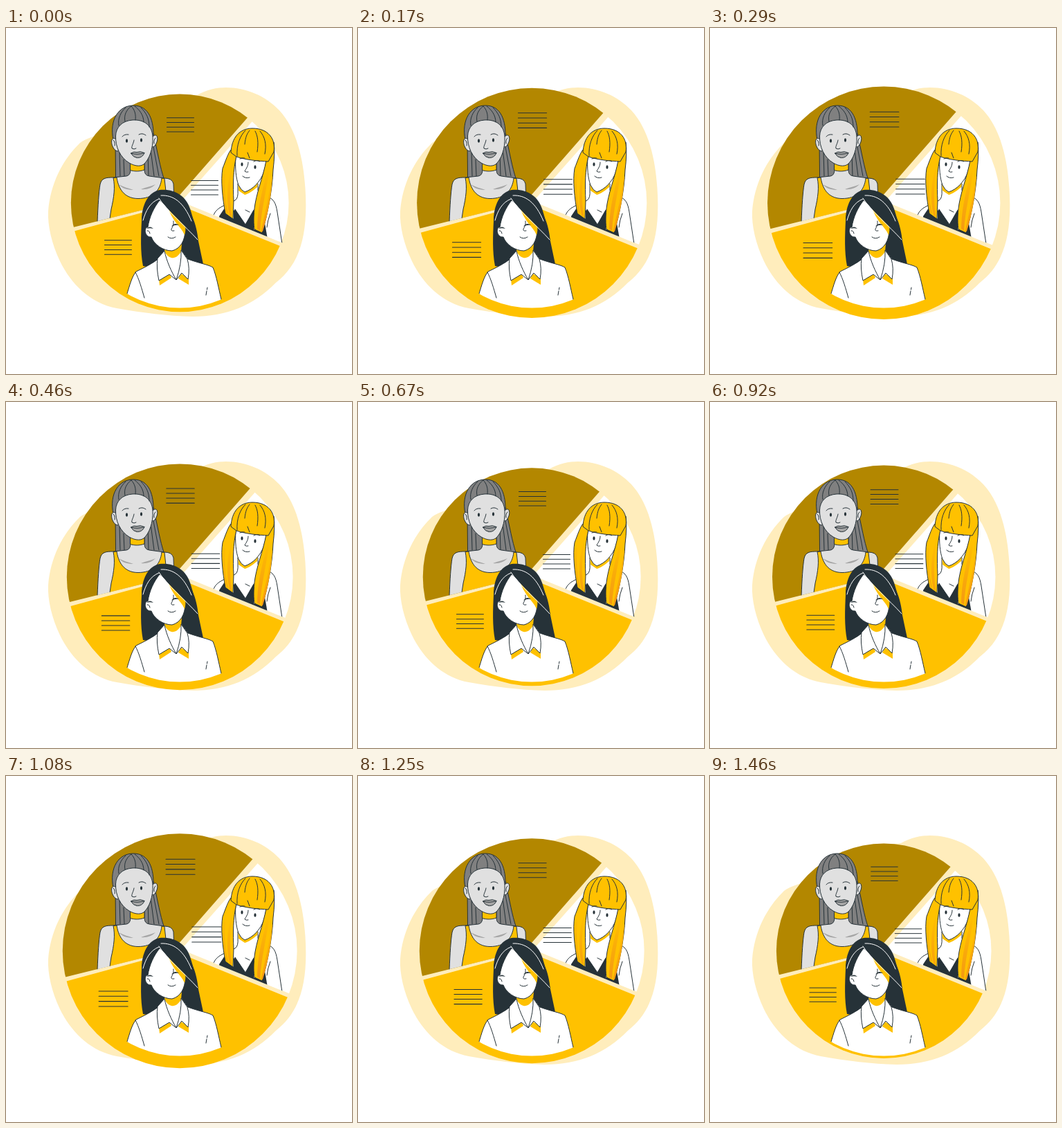
Recreate the animation shown at these times as an HTML page. Size 500 by 500 pixels, loop 1.5 s.

```html
<!DOCTYPE html>
<html lang="en">
<head>
<meta charset="utf-8">
<title>Team pie</title>
<style>
  html, body { margin: 0; width: 100%; height: 100%; overflow: hidden; background: #fff; }
  svg { display: block; width: 100%; height: 100%; }
  .ink { fill: none; stroke: #263238; stroke-width: 1; stroke-linecap: round; stroke-linejoin: round; }
  .dark { fill: #263238; }
  .white { fill: #fff; }
  .amber { fill: #ffc100; }
  .skin { fill: #e0e0e0; }
  .hair { fill: #808080; }
  .shade { fill: #a6a6a6; }
  .strand { fill: url(#strand); }
  .edge { stroke: #263238; stroke-width: 1; stroke-linejoin: round; }
  .shine { fill: none; stroke: #fff; stroke-width: 1; stroke-linecap: round; }
</style>
</head>
<body>
<svg viewBox="0 0 500 500">
  <defs>
    <clipPath id="disc"><circle cx="251.2" cy="252.8" r="157.3"/></clipPath>
    <clipPath id="leftCut"><path d="M90 90H260V247.3L90 289.7Z"/></clipPath>
    <clipPath id="rightCut"><path d="M285 130H420V318.7L285 263.9Z"/></clipPath>
    <clipPath id="frontCut"><circle cx="251.2" cy="252.6" r="152"/></clipPath>
    <linearGradient id="strand" gradientUnits="userSpaceOnUse" x1="0" y1="200" x2="0" y2="290">
      <stop stop-color="#ffc100"/><stop offset="1" stop-color="#f59a12"/>
    </linearGradient>
  </defs>

  <path fill="#ffedbc" d="M318 86C347 86 375 98 395 119C420 146 430 190 432.500 232C437 300 424 342 390 368
    C358 401 318 417 270 417C232 416 200 412 160 405C122 398 94 370 78 337C66 312 60 285 61 265
    C64 225 82 190 107 166C117 159 127 157 140 152C200 130 240 100 276 97C290 89 305 86 318 86Z"/>

  <g id="pie">
    <g clip-path="url(#disc)">
      <path fill="#b38700" d="M241.700 252L383.200 90.500V60H60V297.200Z"/>
      <path class="white" d="M253 250.900L390 96.500H430V322.800Z"/>
      <path class="amber" d="M245 253.700L430 328.800V430H60V304Z"/>
    </g>
    <path class="ink" d="M232.500 129.700h39m-39 6.800h39m-39 6.800h39m-39 6.800h39
      M267.500 220.500h39m-39 6.800h39m-39 6.800h39m-39 6.800h39
      M142.500 306.800h39m-39 6.800h39m-39 6.800h39m-39 6.800h39"/>
  </g>

  <g clip-path="url(#leftCut)">
    <path class="hair edge" d="M158 160L158.500 217H228C223 202 219 180 213 152L190 130Z"/>
    <path class="ink" d="M164 178L165 214M170 190L171 214M205 180L206 214M209 176L214 214M213 172L221 214"/>
    <path class="skin edge" d="M132 280C133 256 134 238 136 226C138 217 144 216 155 216L174 214Q180 213 180 204V190H200V205Q200 213 207 214L229 217Q240 217 242 225L244 280Z"/>
    <path class="amber edge" d="M155 216.500C158 230 156 245 152 262L149 282H236L229 217.500L225 217C223 236 211 246.500 191 246.500C174 246.500 163 236 160 216Z"/>
    <path class="shade" d="M163 226C170 230 176 231 184 234C175 234 168 232 163 226ZM216 226C209 229 203 230 195 233C204 234 211 231 216 226Z"/>
    <path class="amber edge" d="M179.500 191H200V205C193 207.500 186 207.500 179.500 205.500Z"/>
    <path class="hair edge" d="M155 162C149 132 163 112 184 112C207 112 214 134 213 160L190 140Z"/>
    <path class="skin edge" d="M159 161C153 156 151 164 154 171Q157 178 162 178M212 157C218 151 221 159 217 167Q215 172 212 172"/>
    <path class="skin edge" d="M158.500 156C159 143 168 134 183 133C200 132 211 141 212 157C213 174 207 190 199 197C193 201 185 199 178 195C165 187 158 172 158.500 156Z"/>
    <path class="ink" d="M163 141C161 131 166 121 173 115M172 135C170 126 174 118 181 113M187 133C188 125 186 118 181 113M199 136C199 126 193 118 186 113M207 143C207 131 203 123 195 115
      M168 157Q171 153 177 154M192 154Q197 151 202 155M185 162C184 168 181 171 182 174Q185 176 188 174M155 162Q158 164 157 170M216 159Q213 162 214 167"/>
    <ellipse class="dark" cx="174.500" cy="163" rx="1.600" ry="2.700"/>
    <ellipse class="dark" cx="195.500" cy="162" rx="1.600" ry="2.700"/>
    <path class="shade edge" stroke-width=".8" d="M180.500 181Q185 178 189 179.500Q194 177.500 200 180.500C198 186 193 188 189 187.500Q184 187 180.500 181Z"/>
    <path class="ink" d="M180.500 181Q190 184 200 180.500"/>
  </g>

  <g clip-path="url(#rightCut)">
    <path class="white edge" d="M298 276C301 266 304 262 314 257L331 249Q336 246 335 234V225H364V234Q365 240 374 242C387 246 390 253 392 266L399 312H298Z"/>
    <path class="amber" d="M335.500 226L364 222L363 230C357 235 350 240 345 241L336 235Z"/>
    <path class="dark" d="M316 260L329 276V264L331 262L346 284L358 263L360 266L358 292L372 270L378 305H309L308 272Z"/>
    <path class="ink" d="M331 262L346 284L358 263M346 263L352 266M382 268Q378 278 377 288"/>
    <path class="white edge" d="M332 184C331 203 332 216 336 227Q340 235 345 237C357 233 368 222 373 207L379 180Z"/>
    <path class="amber edge" d="M333 185C328 205 328 228 329 250L328 276L317 268C313 247 310 220 313 203C318 190 321 181 325 176Z"/>
    <path class="amber edge" d="M378 180C374 209 364 231 360 254C357 272 358 285 359 291L370 296C378 270 385 232 386 205Q389 181 387 165Z"/>
    <path class="strand" d="M327 200C319 220 318 250 323 270L326 273C323 245 323 223 328 201ZM315 210C312 230 315 250 319 267L321 268C316 249 315 231 317 211Z
      M379 198C374 225 364 250 363 290L367 293C369 260 378 229 381 199ZM384 211C382 240 373 270 369 294L371 294C379 268 384 240 385 212Z"/>
    <path class="amber edge" d="M325 180C326 159 337 145 356 145C379 145 390 160 387 179L379 193C364 192 348 191 333 186Z"/>
    <path class="ink" d="M334 185C333 169 338 156 346 148M345 168C346 158 348 153 352 148M352 188L349 180M363 179C365 166 364 156 360 149M374 182C377 168 374 157 367 149M338 189Q342 187 345 188M358 193Q362 190 367 193
      M350 194C350 201 346 204 345 207Q347 209 350 208M342 214Q346 218 352 216"/>
    <ellipse class="dark" cx="341" cy="197" rx="1.600" ry="2.800"/>
    <ellipse class="dark" cx="360" cy="201" rx="1.600" ry="2.800"/>
  </g>

  <g clip-path="url(#frontCut)">
    <path class="dark" d="M222 234C244 232 260 243 266 261C274 286 279 313 285 341L240 350L198 344C194 323 195 300 196 278C196 257 205 237 222 234Z"/>
    <path class="white edge" d="M174 387C179 371 182 359 188 352C198 347 211 341 221 333L230 320H253L263 334C279 340 293 342 299 346C304 358 307 375 311 392V410H174Z"/>
    <path class="amber" d="M229 317L254 312L253 323C249 330 244 333 239 332Q232 330 229 322Z"/>
    <path class="amber" d="M221 363L237 356L239 361L222 372ZM249 362L253 355L264 362V371Z"/>
    <path class="white edge" d="M229 322L219 333Q217 347 221 365L236 356L246 364L254 354L263 363Q266 347 262 334L253 321Q254 341 246 364C239 352 232 337 229 322Z"/>
    <path class="white edge" d="M222 249C214 259 207 273 205 288C199 287 200 303 210 302C214 313 227 322 240 322C252 319 259 307 259 291C252 273 237 259 222 249Z"/>
    <path class="amber" d="M234 260L259 285C260 291 259 296 258 299C255 292 250 287 246 282C241 275 237 268 234 260Z"/>
    <path class="dark" d="M221 246C235 265 257 283 278 308C276 285 267 257 246 245Q231 239 221 246Z"/>
    <path class="shine" d="M221 247C208 252 202 264 198 278M221 246C233 265 258 285 277 306M224 242C242 241 257 252 268 279"/>
    <path class="ink" d="M242 279C243 287 238 290 239 292Q240 294 243 293M234 302Q239 306 245 302M204 293Q207 292 208 297
      M187 353C192 362 196 376 200 390M291 375L290.500 378M290 380L289 386"/>
    <path class="dark" d="M203 290Q208 285 213 290Q208 288.500 203 290ZM239 287Q244 280 250 285Q244 284 239 287Z"/>
  </g>
</svg>
<script>
  const pie = document.getElementById('pie');
  const LOOP = 1500, REST = 1.02;
  // Two linear heartbeats: [time in ms, scale]
  const beats = [[-60, 1], [240, 1.1], [785, 1], [1085, 1.1], [1440, 1], [1740, 1.1]];

  function scaleAt(t) {
    const i = beats.findIndex(([end]) => t < end);
    const [t0, s0] = beats[i - 1], [t1, s1] = beats[i];
    return s0 + (s1 - s0) * (t - t0) / (t1 - t0);
  }

  function draw() {
    const s = scaleAt(performance.now() % LOOP) / REST;
    pie.setAttribute('transform', `translate(251.2 252.8) scale(${s}) translate(-251.2 -252.8)`);
    requestAnimationFrame(draw);
  }
  draw();
</script>
</body>
</html>
```
